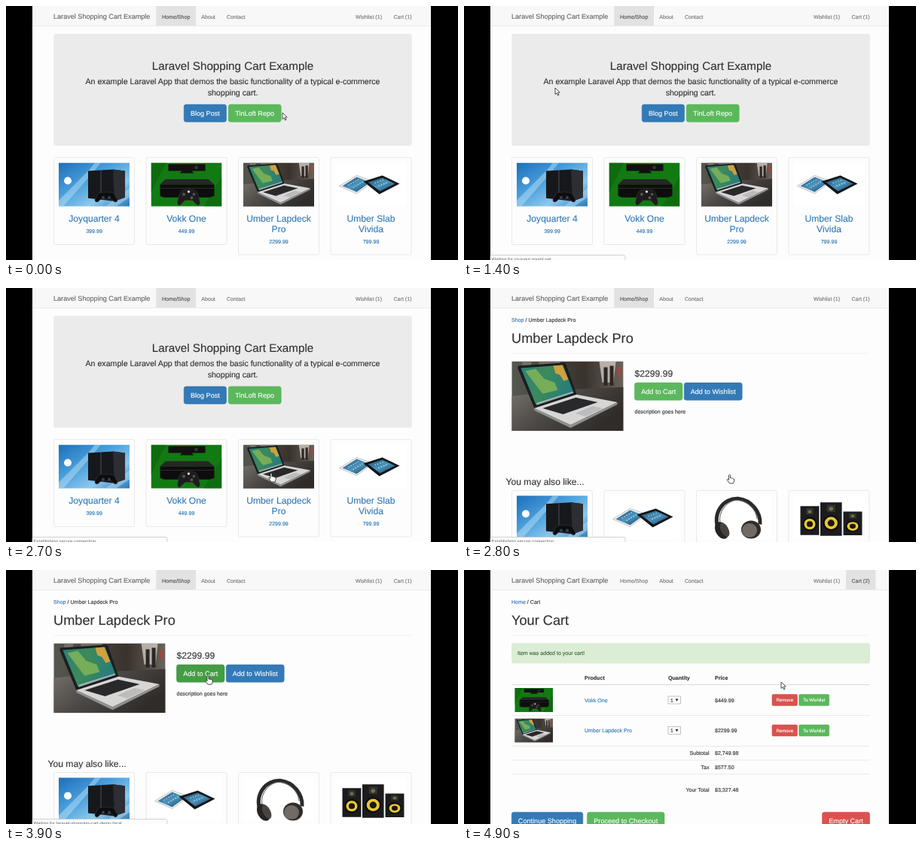
An HTML page for the animation above (5 s loop, 600 by 338 pixels).

```html
<!DOCTYPE html>
<html lang="en">
<head>
<meta charset="utf-8">
<title>Shopping cart demo</title>
<style>
html, body { margin: 0; width: 100%; height: 100%; overflow: hidden; background: #000; }
svg { display: block; width: 600px; height: 338px; font-family: "Liberation Sans", Arial, sans-serif; text-rendering: geometricPrecision; }
text { stroke-width: .14px; }
</style>
</head>
<body>
<svg id="stage" viewBox="0 0 600 338">
<defs>
  <linearGradient id="sky" x2="1" y2="1"><stop stop-color="#1c6fba"/><stop offset=".4" stop-color="#4a9fdc"/><stop offset=".7" stop-color="#8cc8ec"/><stop offset="1" stop-color="#2a78b8"/></linearGradient>
  <linearGradient id="street" x2="1"><stop stop-color="#55584f"/><stop offset=".3" stop-color="#4a463f"/><stop offset=".65" stop-color="#3a332d"/><stop offset="1" stop-color="#6a625b"/></linearGradient>
  <linearGradient id="ledge" x2="1" y2=".5"><stop stop-color="#77746f"/><stop offset=".5" stop-color="#4b4845"/><stop offset="1" stop-color="#2f2c2a"/></linearGradient>
  <linearGradient id="map" x2="1" y2=".3"><stop stop-color="#2b8078"/><stop offset=".5" stop-color="#3c8a5c"/><stop offset="1" stop-color="#2a7c7c"/></linearGradient>
  <linearGradient id="glow" x2="1" y2="1"><stop stop-color="#1d4a78"/><stop offset=".5" stop-color="#4d97bd"/><stop offset="1" stop-color="#173a60"/></linearGradient>
  <symbol id="console" viewBox="0 0 94 58" preserveAspectRatio="none">
    <path fill="url(#sky)" d="M0 0h94v58H0z"/>
    <path fill="#c4e4f6" opacity=".45" d="M0 50L40 10 48 0h8L36 24 6 58H0zM94 34L62 58h14l18-12z"/>
    <circle cx="12" cy="24" r="5" fill="#fff"/>
    <path fill="#17181c" d="M39 11l33-2 16 2v35l-14 5-35-4z"/>
    <path fill="#2c2e34" d="M72 9l16 2v35l-14 5z"/>
    <path stroke="#6a7480" stroke-width=".6" d="M56 10v37"/>
    <path fill="#0c0d10" stroke="#3b4048" stroke-width=".5" d="M53 40q10-2 20 0l5 9q0 4-4 3l-4-4H56l-4 4q-4 1-4-3z"/>
    <g fill="#3a3f47"><circle cx="59" cy="46" r="2"/><circle cx="67" cy="46" r="2"/></g>
  </symbol>
  <symbol id="box" viewBox="0 0 94 58" preserveAspectRatio="none">
    <path fill="#127a12" d="M0 0h94v58H0z"/>
    <path fill="#0b5e0d" opacity=".5" d="M0 0h20L0 40zM94 58H70l24-40z"/>
    <path fill="#111" d="M23 2h49v9H54l3 3H38l3-3H23z"/>
    <circle cx="60" cy="6.5" r="2.4" fill="#333"/>
    <path fill="#262626" d="M19 22h57l8 7H12z"/>
    <path fill="#0d0d0d" d="M12 29h72v15l-6 2H17l-5-2z"/>
    <path stroke="#444" stroke-width=".6" d="M12 34h72"/>
    <path fill="#1c1c1c" stroke="#444" stroke-width=".5" d="M41 37q9-3 18 0 4 3 6 16-1 5-4 3l-6-6H45l-6 6q-3 2-4-3 2-13 6-16z"/>
    <circle cx="50" cy="38.5" r="1.7" fill="#ddd"/>
    <g fill="#555"><circle cx="43.5" cy="42" r="2"/><circle cx="54" cy="46.5" r="2"/><circle cx="57" cy="42" r="1.8"/></g>
  </symbol>
  <symbol id="laptop" viewBox="0 0 148 92" preserveAspectRatio="none">
    <path fill="url(#street)" d="M0 0h148v92H0z"/>
    <path fill="#80786d" opacity=".8" d="M14 0h12v20H14zM36 0h28v8H36z"/>
    <path fill="#cfc8c0" opacity=".8" d="M116 0h22l-3 28h-15z"/>
    <path fill="#2c2624" d="M122 8h5v24h-5zM130 6h5v26h-5z"/>
    <path fill="#a8423c" d="M140 9h4v11h-4z"/>
    <path fill="url(#ledge)" d="M0 46l84-9 64-3v58H0z"/>
    <path fill="#1b1e20" d="M9 6l60-4q2 0 3 2l14 40-56 18L8 9z"/>
    <path fill="url(#map)" d="M12 9l56-4 14 36-50 16z"/>
    <path fill="#d0a13e" d="M55 6l12-1 8 19-6 2-5-8-6-2z"/>
    <path fill="#75ad58" d="M18 13l14-3 11 13 14 5 4 10-20 5-10-13z"/>
    <path fill="#c9d5d6" opacity=".7" d="M33 55l48-15 1 2-49 16z"/>
    <path fill="#d6d6d5" d="M30 62l56-18 54 10-62 30z"/>
    <path fill="#29292b" d="M41 62l44-14 29 6-46 16z"/>
    <path fill="#bcbcbc" d="M84 69l23-10 14 3-23 11z"/>
    <path fill="#909090" d="M30 62l48 22 62-30v3L78 88 30 65z"/>
  </symbol>
  <symbol id="tablets" viewBox="0 0 94 58" preserveAspectRatio="none">
    <path fill="#fff" d="M0 0h94v58H0z"/>
    <path fill="#f1f1f1" stroke="#aaa" stroke-width=".7" d="M5 31l23-14 22 8-22 16z"/>
    <path fill="url(#glow)" d="M9 31l19-12 18 7-18 13z"/>
    <path fill="#141518" d="M37 25l25-8 23 11-27 14z"/>
    <path fill="url(#glow)" d="M43 26l19-6 17 8-20 10z"/>
    <path stroke="#dce9ee" stroke-dasharray="1.5 2" d="M17 30l14-8M23 33l14-8M52 27l12-4M57 31l13-5"/>
  </symbol>
  <symbol id="phones" viewBox="0 0 94 58" preserveAspectRatio="none">
    <path fill="#fff" d="M0 0h94v58H0z"/>
    <path fill="none" stroke="#2b2a2a" stroke-width="5" d="M23 46C14 22 30 3 49 4c18 2 30 18 29 34"/>
    <path fill="none" stroke="#66615d" d="M25 36C22 20 36 5 49 6c14 2 24 13 25 25"/>
    <ellipse cx="27" cy="46" rx="8" ry="12" fill="#262525" transform="rotate(-28 27 46)"/>
    <ellipse cx="31" cy="45" rx="5" ry="10" fill="#48433f" transform="rotate(-28 31 45)"/>
    <ellipse cx="66" cy="45" rx="13" ry="12" fill="#2f2d2c"/>
    <ellipse cx="64" cy="46" rx="10" ry="9.5" fill="#716b65"/>
  </symbol>
  <g id="speaker">
    <path fill="#1c1c1e" d="M0 0h26v42H0z"/>
    <path fill="#333" d="M8 3h10v9H8z"/><circle cx="13" cy="8" r="2.5" fill="#77703f"/>
    <circle cx="13" cy="26" r="10" fill="#0c0c0c"/><circle cx="13" cy="26" r="7.8" fill="#e8c832"/>
    <circle cx="13" cy="26" r="4.2" fill="#1a1810"/>
  </g>
  <symbol id="speakers" viewBox="0 0 94 58" preserveAspectRatio="none">
    <path fill="#fff" d="M0 0h94v58H0z"/>
    <use href="#speaker" transform="translate(9 14) scale(.96 .91)"/>
    <use href="#speaker" transform="translate(35.5 9) scale(1.1 1.05)"/>
    <use href="#speaker" transform="translate(66 21) scale(.96 .75)"/>
  </symbol>
</defs>
<path fill="#fdfdfd" d="M35 0h529v338H35z"/>
<g id="nav"></g>
<g id="home"></g>
<g id="detail"></g>
<g id="cart"></g>
<g id="status">
  <path fill="#fcfcfc" stroke="#c8c8c8" stroke-width=".8" d="M35 331.5h177q2 0 2 2v6H35z"/>
  <text id="message" x="36.5" y="339" font-size="6" fill="#666"></text>
</g>
<path id="arrow" fill="#fff" stroke="#222" stroke-width=".8" d="M0 0v8.5l2-1.8 1.5 3.3 1.5-.7-1.5-3.2h2.7z"/>
<path id="hand" fill="#fff" stroke="#222" stroke-width=".8" stroke-linejoin="round" d="M-1 1q1-1.700 2 0v4l1-.4 1 .7 1-.2.8.7q1.300-.2 1.300 1V9l-1.200 3H0L-3.200 7.500q0-1.600 1.200-1L-1 7.500z"/>
</svg>
<script>
const $ = id => document.getElementById(id);
const BODY = 7.09, LARGE = 9.1, H3 = 12.15, LINK = '#337ab7', INK = '#333';
const BLUE = ['#337ab7', '#2e6da4'], GREEN = ['#5cb85c', '#4cae4c'], RED = ['#d9534f', '#d43f3a'];
const LAPTOP = 'Umber Lapdeck', BOX = 'Vokk One';

const text = (s, x, y, size = BODY, fill = INK, anchor = 'start', weight = 400) =>
  `<text x="${x}" y="${y}" font-size="${size}" fill="${fill}" stroke="${fill}" text-anchor="${anchor}" font-weight="${weight}">${s}</text>`;
const rect = (x, y, w, h, fill, stroke = 'none', r = 0, id = '') =>
  `<rect id="${id}" x="${x}" y="${y}" width="${w}" height="${h}" rx="${r}" fill="${fill}" stroke="${stroke}" stroke-width=".5"/>`;
const rule = (y, fill = '#ddd', h = .6) => rect(63.3, y, 475.4, h, fill);
const image = (id, x, y, w, h) => `<use href="#${id}" x="${x}" y="${y}" width="${w}" height="${h}"/>`;
const button = (s, x, y, w, [fill, edge], id) =>
  rect(x, y, w, 23.3, fill, edge, 3, id) + text(s, x + w / 2, y + 15, LARGE, '#fff', 'middle');
const smallButton = (s, x, y, w, [fill, edge]) =>
  rect(x, y, w, 15, fill, edge, 1.5) + text(s, x + w / 2, y + 9.6, 6.07, '#fff', 'middle');
const heading = (parent, crumb, title) =>
  text(`<tspan fill="${LINK}" stroke="${LINK}">${parent}</tspan> / ${crumb}`, 63, 44.5) +
  text(title, 63, 73, 18.2) + rule(86.7, '#e9e9e9');

function card(i, y, pic, lines = [], price = '') {
  const x = 63.5 + 122.5 * i, mid = x + 53.5, last = y + 72 + 13.4 * lines.length;
  return rect(x, y, 107, last + 30.5 - y, '#fdfdfd', '#d4d4d4', 2) + image(pic, x + 6.5, y + 6.8, 94, 58.3) +
    lines.map((s, n) => text(s, mid, y + 85.6 + 13.4 * n, H3, LINK, 'middle')).join('') +
    text(price, mid, last + 15.2, BODY, LINK, 'middle');
}

function cartRow(y, pic, name, price) {
  return image(pic, 67.3, y - 16, 50.7, 32) + text(name, 160, y + 2.6, BODY, LINK) +
    rect(271, y - 5, 16.3, 10, '#fff', '#888') + text('1', 274, y + 2.6, 6.8) +
    `<path d="M280.5 ${y - 1.4}h4l-2 3.2z" fill="#222"/>` + text(price, 333, y + 2.6) +
    smallButton('Remove', 409, y - 7.5, 33.5, RED) + smallButton('To Wishlist', 444.7, y - 7.5, 40, GREEN);
}

const total = (label, value, y) => text(label, 325.5, y, BODY, INK, 'end') + text(value, 333, y);

function nav(inCart) {
  const item = (s, x, on) => text(s, x, 16.5, BODY, on ? '#555' : '#777');
  return rect(35, 0, 529, 26, '#f8f8f8') + rect(35, 26, 529, .6, '#dedede') +
    (inCart ? rect(507, 0, 39.5, 26, '#e2e2e2') : rect(199.3, 0, 52.7, 26, '#e2e2e2')) +
    text('Laravel Shopping Cart Example', 63, 17, LARGE, '#666') +
    item('Home/Shop', 207, !inCart) + item('About', 259.3) + item('Contact', 293) +
    item('Wishlist (1)', 464) + item(`Cart (${inCart ? 2 : 1})`, 514.5, inCart);
}

$('home').innerHTML = rect(63.3, 37, 475.5, 149, '#ebebeb', 'none', 3) +
  text('Laravel Shopping Cart Example', 301, 85, 15.2, INK, 'middle') +
  text('An example Laravel App that demos the basic functionality of a typical e-commerce', 301, 104, 10.63, INK, 'middle') +
  text('shopping cart.', 301, 119.4, 10.63, INK, 'middle') +
  button('Blog Post', 236.2, 131, 56.3, BLUE) + button('TinLoft Repo', 295.2, 131, 70, GREEN) +
  card(0, 201.6, 'console', ['Joyquarter 4'], '399.99') + card(1, 201.6, 'box', [BOX], '449.99') +
  card(2, 201.6, 'laptop', [LAPTOP, 'Pro'], '2299.99') + card(3, 201.6, 'tablets', ['Umber Slab', 'Vivida'], '799.99');

$('detail').innerHTML = heading('Shop', LAPTOP + ' Pro', LAPTOP + ' Pro') +
  image('laptop', 63.3, 97.5, 148.3, 92.7) + text('$2299.99', 226.5, 118.3, H3) +
  button('Add to Cart', 226.5, 126, 63.5, GREEN, 'add') + button('Add to Wishlist', 292.2, 126, 77, BLUE) +
  text('description goes here', 226.5, 167) + text('You may also like...', 55.5, 261.7, H3) +
  ['console', 'tablets', 'phones', 'speakers'].map((pic, i) => card(i, 269.5, pic)).join('');

$('cart').innerHTML = heading('Home', 'Cart', 'Your Cart') +
  rect(63.5, 97.7, 475, 26.3, '#dbedd4', '#d0e6c0', 2) + text('Item was added to your cart!', 71, 113.4, BODY, '#3c663d') +
  [['Product', 160], ['Quantity', 271], ['Price', 333]].map(([s, x]) => text(s, x, 145.8, BODY, INK, 'start', 700)).join('') +
  rule(152.2, '#d8d8d8', 1) + [193.3, 234, 252.7, 271.3].map(y => rule(y)).join('') +
  cartRow(173, 'box', BOX, '$449.99') + cartRow(213.5, 'laptop', LAPTOP + ' Pro', '$2299.99') +
  total('Subtotal', '$2,749.98', 246) + total('Tax', '$577.50', 264.7) + total('Your Total', '$3,327.48', 294.6) +
  button('Continue Shopping', 63.3, 322.3, 94.5, BLUE) + button('Proceed to Checkout', 163.5, 322.3, 102.5, GREEN) +
  button('Empty Cart', 475.5, 322.3, 63, RED);

// [ms, x, y] of the pointer tip
const path = [[0, 367, 142], [500, 310, 120], [1400, 121, 109], [2400, 352, 246], [2700, 352, 246], [2800, 352.5, 248],
  [3400, 269, 142], [3700, 269, 142], [4100, 267, 138.5], [4200, 267, 138.5], [4900, 421, 149]];
// [ms, text] of the browser's status bubble
const messages = [[0, ''], [700, 'Waiting for cp-input.mxpnl.net...'], [1700, 'Establishing secure connection...'],
  [3200, ''], [3700, 'Waiting for laravel-shopping-cart-demo.local...'], [4400, '']];

function pointer(t) {
  const i = Math.max(1, path.findIndex(p => p[0] >= t));
  const [a, b] = [path[i - 1], path[i]];
  const u = (t - a[0]) / (b[0] - a[0]), e = u * u * (3 - 2 * u);
  return [a[1] + (b[1] - a[1]) * e, a[2] + (b[2] - a[2]) * e];
}
const show = (id, on) => $(id).setAttribute('display', on ? 'inline' : 'none');
const start = performance.now();
let last = -1;

function draw(t) {
  const inCart = t >= 4100, inDetail = t >= 2800 && !inCart;
  $('nav').innerHTML = nav(inCart);
  show('home', t < 2800);
  show('detail', inDetail);
  show('cart', inCart);
  const hover = t >= 3300;
  $('add').setAttribute('fill', hover ? '#449d44' : GREEN[0]);
  $('add').setAttribute('stroke', hover ? '#398439' : GREEN[1]);
  const message = messages.filter(m => m[0] <= t).pop()[1];
  $('message').textContent = message;
  show('status', message);
  const hand = t >= 2300 && t < 2900 || t >= 3300 && t < 4300;
  const at = `translate(${pointer(t)})`;
  for (const id of ['arrow', 'hand']) {
    show(id, (id === 'hand') === hand);
    $(id).setAttribute('transform', at);
  }
}

function tick() {
  const t = Math.floor((performance.now() - start) % 5000 / 100) * 100;
  if (t !== last) draw(last = t);
  requestAnimationFrame(tick);
}
tick();
</script>
</body>
</html>
```
